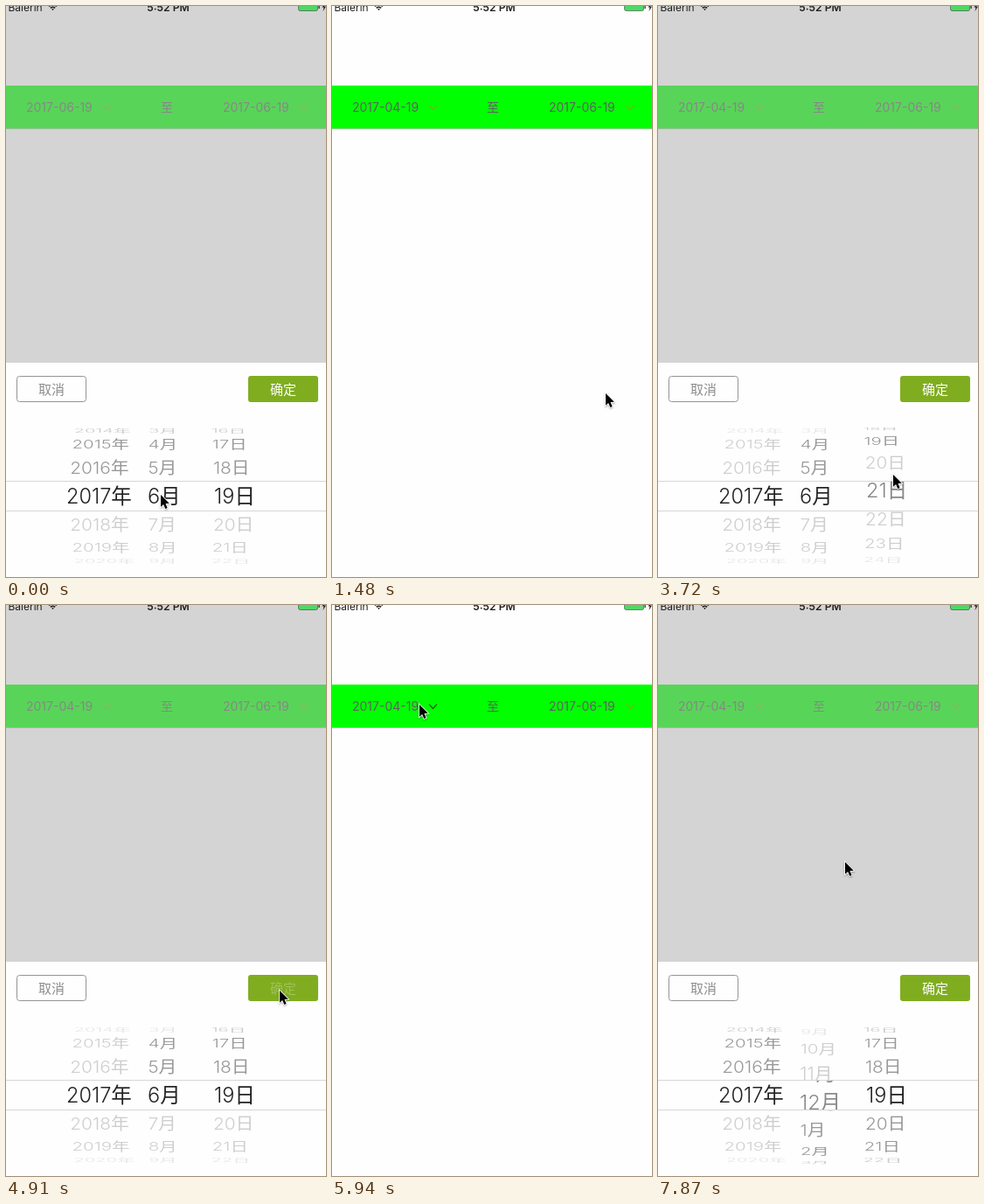
Write an HTML page with a canvas that moves like this. It is 366x653 px and loops after 8 s.

```html
<!DOCTYPE html>
<html lang="zh">
<head>
<meta charset="utf-8">
<style>
html, body { margin: 0; width: 100%; height: 100%; overflow: hidden; background: #fefefe; }
canvas { display: block; }
</style>
</head>
<body>
<canvas id="stage" width="366" height="653"></canvas>
<script>
const c = document.getElementById('stage').getContext('2d');
const LOOP = 8000, TICK = 148.6, W = 366, H = 653, MID = 560.5;
const FONT = 'Inter, "Noto Sans CJK SC", "Noto Sans CJK JP", "Noto Sans CJK", sans-serif';
const INK = '#222', OFF = '#fefefe';

// Smooth progress from 0 to 1 between ticks a and b
function ease(k, a, b) {
  const f = Math.min(1, Math.max(0, (k - a) / (b - a)));
  return f * f * (3 - 2 * f);
}

// Pointer gestures: first tick, last tick, destination
const gestures = [
  [0, 4, 180, 638],    // drag months down
  [4, 9, 312, 442],    // confirm
  [11, 14, 291, 119],  // right date
  [18, 22, 264, 608],
  [22, 25, 268, 535],  // drag days up
  [25, 32, 312, 440],  // confirm
  [34, 39, 99, 113],   // left date
  [43, 50, 190, 604],
  [51, 53, 213, 293],  // fling months up
];

function pointerAt(k) {
  let x = 176, y = 558;
  for (const [a, b, toX, toY] of gestures) {
    const f = ease(k, a, b);
    x += (toX - x) * f;
    y += (toY - y) * f;
  }
  return [x, y];
}

function text(s, x, y, size, color, align = 'left', weight = 400) {
  c.font = `${weight} ${size}px ${FONT}`;
  c.textAlign = align;
  c.fillStyle = color;
  c.fillText(s, x, y);
}

function path(points, close) {
  c.beginPath();
  points.forEach(([x, y]) => c.lineTo(x, y));
  if (close) c.closePath();
}

function box(x, y, w, h, r) {
  c.beginPath();
  c.roundRect(x, y, w, h, r);
}

function chevron(x, pressed) {
  path([[x, 113.5], [x + 4.5, 118.5], [x + 9, 113.5]]);
  c.strokeStyle = pressed ? '#23601a' : '#6cbc10';
  c.lineWidth = 1.2;
  c.stroke();
}

function dates(start, tapped) {
  c.fillStyle = '#0f0';
  c.fillRect(0, 91, W, 49);
  c.fillStyle = '#b8c8b8';
  c.fillRect(0, 140, W, 1);
  text(start, 23, 121.3, 14, '#606060');
  text('至', 184, 121.3, 14, '#606060', 'center');
  text('2017-06-19', 248, 121.3, 14, '#606060');
  chevron(111, tapped === 'left');
  chevron(336.5, tapped === 'right');
}

function statusBar() {
  text('Balerin', 2.5, 5.5, 12, INK);
  text('5:52 PM', 185.5, 5.5, 12.2, INK, 'center', 600);
  c.strokeStyle = INK;
  c.lineWidth = 1.7;
  for (const r of [1, 3.7, 6.4]) {
    c.beginPath();
    c.arc(53.5, 5, r, -Math.PI * .75, -Math.PI * .25);
    c.stroke();
  }
  c.lineWidth = .5;
  box(334.5, -4.5, 22, 10, 2);
  c.fillStyle = '#4cd964';
  c.fill();
  c.stroke();
  c.fillStyle = INK;
  c.fillRect(357.5, -1, 1.2, 4);
  path([[365, -3], [361.5, 1.5], [363.5, 1.5], [362.5, 6], [366, .5], [364, .5]], true);
  c.fill();
}

const wrap = (v, n) => (v - 1 + n) % n + 1;

// One cylinder of the picker; the centre band is shown magnified
function wheel(pos, x, label, valid) {
  for (const band of [false, true]) {
    c.save();
    c.beginPath();
    if (band) c.rect(0, 544, W, 33);
    else {
      c.rect(0, 481, W, 62);
      c.rect(0, 578, W, 62);
    }
    c.clip();
    for (let v = Math.round(pos) - 3; v <= Math.round(pos) + 3; v++) {
      const d = v - pos, far = Math.abs(d), angle = d * .429;
      if (far > 3.4) continue;
      const ok = valid(v), p = band ? 1 : 1 - .02 * far;
      c.save();
      c.translate(183, MID + 78 * Math.sin(angle));
      c.scale(p, p * Math.cos(angle));
      c.globalAlpha = far > 2.5 && !band ? .5 : 1;
      const color = band ? (ok ? INK : '#888') : ok ? '#989898' : '#cecece';
      text(label(v), x - 183 - (band && x < 100 ? 2 : 0), band ? 8.6 : 7.8, band ? 23.5 : 21.3, color, 'left', 300);
      c.restore();
    }
    c.restore();
  }
}

function picker(side, month, day, pressed) {
  c.fillStyle = 'rgba(172,172,172,.51)';
  c.fillRect(0, 0, W, H);
  c.fillStyle = OFF;
  c.fillRect(0, 408, W, H - 408);
  c.lineWidth = 1;
  c.strokeStyle = '#949494';
  box(12.5, 423.5, 79, 29, 3);
  c.stroke();
  text('取消', 52, 443.5, 15, '#8c8c8c', 'center');
  c.fillStyle = '#80ad20';
  box(277, 423, 80, 30, 3);
  c.fill();
  text('确定', 317, 443.5, 15, pressed ? 'rgba(255,255,255,.25)' : '#fff', 'center');
  c.fillStyle = '#d6d6d6';
  c.fillRect(0, 543, W, 1);
  c.fillRect(0, 577, W, 1);

  const isStart = side === 'left';
  wheel(2017, 71, v => v + '年', v => isStart ? v <= 2017 : v === 2017);
  wheel(month, 162, v => wrap(v, 12) + '月', v => wrap(v, 12) <= 6 && (isStart || wrap(v, 12) >= 4));
  wheel(day, 238, v => wrap(v, 31) + '日', v => v <= 19 || Math.round(month) !== 6);
}

function cursor([x, y]) {
  c.save();
  c.translate(x + 1, y + 1);
  c.scale(.95, .95);
  path([[0, 0], [0, 14.5], [3.3, 11.5], [5.6, 16.8], [8, 15.8], [5.8, 10.6], [10.3, 10.3]], true);
  c.shadowColor = 'rgba(0,0,0,.35)';
  c.shadowBlur = 2;
  c.shadowOffsetY = 1;
  c.lineWidth = 1.8;
  c.strokeStyle = '#fff';
  c.stroke();
  c.shadowColor = 'transparent';
  c.fillStyle = '#000';
  c.fill();
  c.restore();
}

function draw(now) {
  // The screen refreshes once per tick
  const k = Math.floor((now % LOOP + 9) / TICK);
  const within = (a, b) => k >= a && k < b;
  const open = k < 10 || k >= 42 ? 'left' : within(16, 34) ? 'right' : '';
  const tapped = k === 15 ? 'right' : within(40, 42) ? 'left' : '';
  const month = open === 'right' ? 6
    : k < 10 ? 6 - 2 * ease(k, 0, 4) : 4 + 7.76 * ease(k, 51, 53);
  const day = 19 + 2.2 * (ease(k, 22, 25) - ease(k, 25, 28));

  c.fillStyle = OFF;
  c.fillRect(0, 0, W, H);
  dates(k < 10 ? '2017-06-19' : '2017-04-19', tapped);
  if (open) picker(open, month, day, k === 9 || k === 33);
  statusBar();
  cursor(pointerAt(k));
  requestAnimationFrame(() => draw(performance.now()));
}
draw(0);
</script>
</body>
</html>
```
